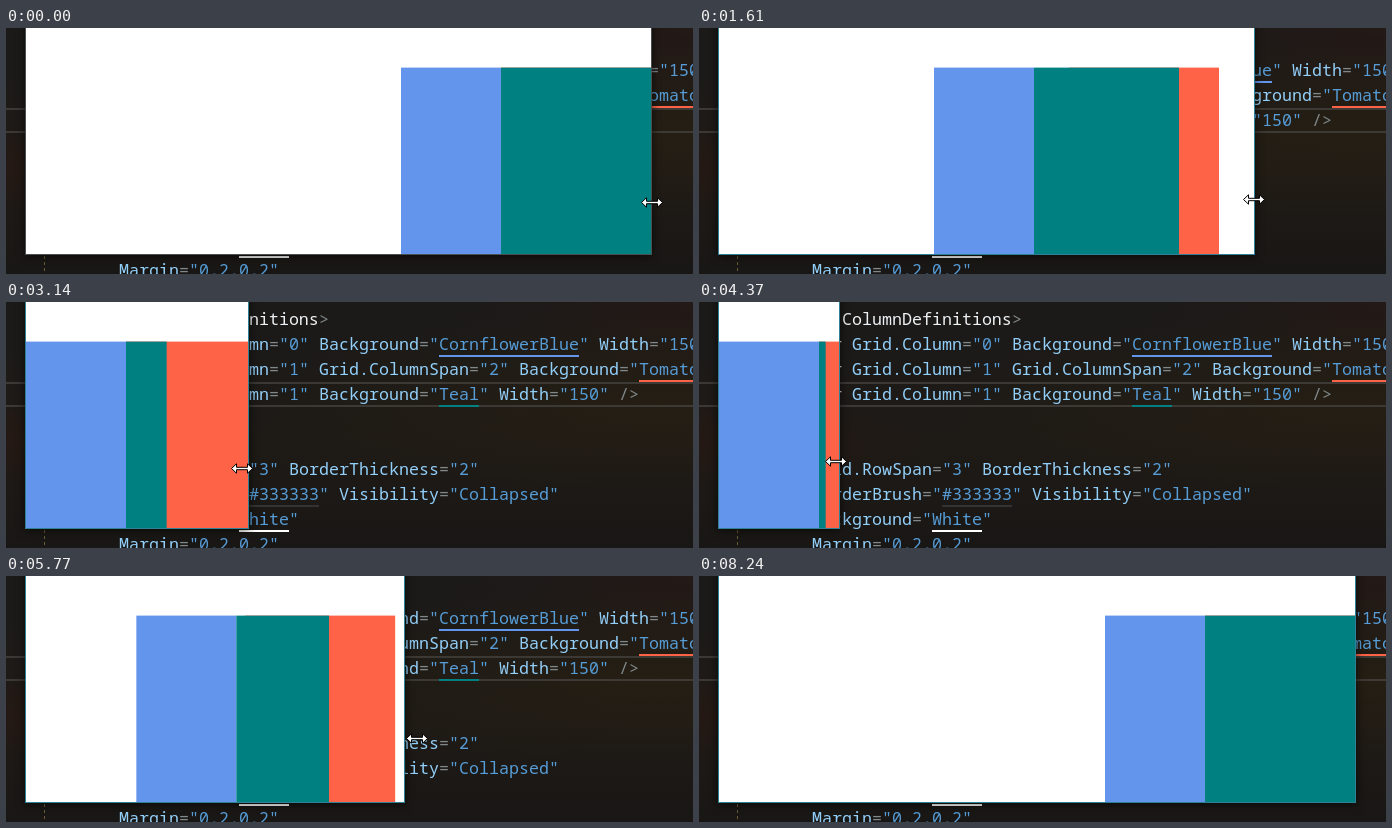
An HTML page that plays this animation: 687x246 px, repeating every 8560 ms.

```html
<!DOCTYPE html>
<html lang="en">
<head>
<meta charset="utf-8">
<title>Resizing a grid</title>
<style>
html, body { margin: 0; width: 100%; height: 100%; overflow: hidden; background: #1b1917; }
#stage {
  position: relative; width: 687px; height: 246px; overflow: hidden;
  background:
    radial-gradient(ellipse at 95% 42%, rgba(48, 36, 14, .4), transparent 45%),
    radial-gradient(ellipse at 100% 0, rgba(48, 24, 18, .4), transparent 25%),
    radial-gradient(ellipse at 0 57%, rgba(46, 22, 16, .4), transparent 25%),
    linear-gradient(#1b1a19, #1e1a16 60%, #191715);
}
svg { position: absolute; left: 0; top: 0; display: block; }
text { font: 16.667px "Noto Sans Mono", "DejaVu Sans Mono", monospace; white-space: pre; }
.tag { fill: #eef1f4; }
.attr { fill: #92cff9; }
.value { fill: #569cd6; }
.mark { fill: #80888a; }
#shade { filter: drop-shadow(0 1px 5px rgba(0, 0, 0, .65)); }
</style>
</head>
<body>
<div id="stage">
<svg width="687" height="246" viewBox="0 0 687 246">
  <g id="code">
    <path d="M0 81H687M0 104H687" stroke="#45433f" stroke-width="1.6"/>
    <path d="M38.5 0V246" stroke="#6a5b35" stroke-dasharray="3 3"/>
  </g>
  <rect id="shade" y="-20" height="247" fill="#111"/>
  <rect id="pane" y="-20" height="246" fill="white"/>
  <rect id="blue" y="39.6" height="186.4" fill="cornflowerblue"/>
  <rect id="tomato" y="39.6" height="186.4" fill="tomato"/>
  <rect id="teal" y="39.6" height="186.4" fill="teal"/>
  <rect id="frame" y="-20.5" height="247" fill="none"/>
  <path id="cursor" d="M-10.5 0L-5.5-4.7V-1.2H5.5V-4.7L10.5 0L5.5 4.7V1.2H-5.5V4.7Z"
        fill="white" stroke="black" stroke-linejoin="round"/>
</svg>
</div>
<script>
const LOOP = 8560;
const FPS = 13;
const LEFT = 20;
const CHAR = 10;
const ROW = 24.9;
const $ = id => document.getElementById(id);

const code = `    </Grid.ColumnDefinitions>
    <Border Grid.Column="0" Background="CornflowerBlue" Width="150" />
    <Border Grid.Column="1" Grid.ColumnSpan="2" Background="Tomato" />
    <Border Grid.Column="1" Background="Teal" Width="150" />


        Grid.RowSpan="3" BorderThickness="2"
        BorderBrush="#333333" Visibility="Collapsed"
        Background="White"
        Margin="0,2,0,2"`;

function add(name, attrs, text = "") {
  const el = document.createElementNS("http://www.w3.org/2000/svg", name);
  for (const key in attrs) el.setAttribute(key, attrs[key]);
  el.textContent = text;
  $("code").append(el);
}

function kind(token, before) {
  if (token[0] === '"') return "value";
  if (/^[<>\/=]/.test(token)) return "mark";
  return /[.<\/]$/.test(before) ? "tag" : "attr";
}

function writeCode() {
  code.split("\n").forEach((line, row) => {
    const y = 23.4 + row * ROW;
    for (const { 0: token, index } of line.matchAll(/"[^"]*"|<\/?|\/?>|=|[\w.]+/g)) {
      const x = 33 + index * CHAR;
      add("text", { x, y, class: kind(token, line.slice(0, index)) }, token);
      // colour values get an underline in that colour
      const fill = token.slice(1, -1);
      if (token[0] === '"' && CSS.supports("color", fill))
        add("rect", { x: x + CHAR, y: Math.round(y + 5), width: fill.length * CHAR, height: 2, fill });
    }
  });
}

// time, window edge, cursor x, cursor y
const keys = [
  [530, 656, 656, 174],
  [1450, 568, 573, 172],
  [1610, 555, 555, 171],
  [2370, 416, 421, 169],
  [3140, 242, 236, 166],
  [4070, 140, 137, 159],
  [4610, 140, 137, 159],
  [5770, 398, 411, 162],
  [6690, 574, 580, 168],
  [7840, 656, 660, 177]
];
const drags = [610, 4694];

// the picture is refreshed at a fixed rate counted from the start of each drag
function snap(time) {
  const floor = t => Math.floor(t / 10) * 10;
  const start = drags.findLast(d => floor(d) <= time);
  if (!start) return time;
  const n = Math.floor((floor(time) + 9.99 - start) * FPS / 1000);
  return floor(start + n * 1000 / FPS);
}

const slope = (i, c) => (keys[i + 1][c] - keys[i][c]) / (keys[i + 1][0] - keys[i][0]);

// harmonic mean keeps the curve from overshooting
function tangent(i, c) {
  if (i === 0 || i === keys.length - 1) return 0;
  const a = slope(i - 1, c), b = slope(i, c);
  return a * b > 0 ? 2 * a * b / (a + b) : 0;
}

function sample(time, c) {
  const last = keys.length - 1;
  const t = Math.min(Math.max(time, keys[0][0]), keys[last][0]);
  const i = Math.min(last - 1, keys.findLastIndex(k => k[0] <= t));
  const p = keys[i], q = keys[i + 1], h = q[0] - p[0];
  const u = (t - p[0]) / h, v = 1 - u;
  return Math.round(p[c] * (1 + 2 * u) * v * v + q[c] * (1 + 2 * v) * u * u
    + h * u * v * (tangent(i, c) * v - tangent(i + 1, c) * u));
}

function span(id, x, end) {
  $(id).setAttribute("x", x);
  $(id).setAttribute("width", Math.max(0, end - x));
}

// blue keeps 100 px; teal takes a third of the rest until it reaches 150 px
function layout(edge) {
  const free = edge - LEFT - 100;
  const teal = Math.min(150, free / 3);
  const wanted = teal < 150 ? Math.max(150, teal + 75) : 150;
  const room = Math.min(free, wanted);
  const start = edge - room;
  const gap = Math.max(0, (room - 150) / 2);
  span("shade", LEFT - 1, edge + 1);
  span("pane", LEFT, edge);
  span("blue", start - 100, start);
  span("tomato", start + gap, edge - gap);
  span("teal", start, start + teal);
  span("frame", LEFT - 0.5, edge + 0.5);
}

function draw(time) {
  const t = snap(time);
  const idle = time < 290;
  const shift = idle ? -11 : 0;
  layout(sample(t, 1) + shift);
  $("frame").setAttribute("stroke", idle ? "#4a4f50" : "#2f8296");
  $("cursor").setAttribute("transform",
    `translate(${sample(t, 2) + (idle ? -10 : 0)} ${sample(t, 3) + 0.5})`);
  $("cursor").setAttribute("visibility", time < 8240 ? "visible" : "hidden");
}

writeCode();
const begin = performance.now();
function tick() {
  draw((performance.now() - begin) % LOOP);
  requestAnimationFrame(tick);
}
tick();
</script>
</body>
</html>
```
